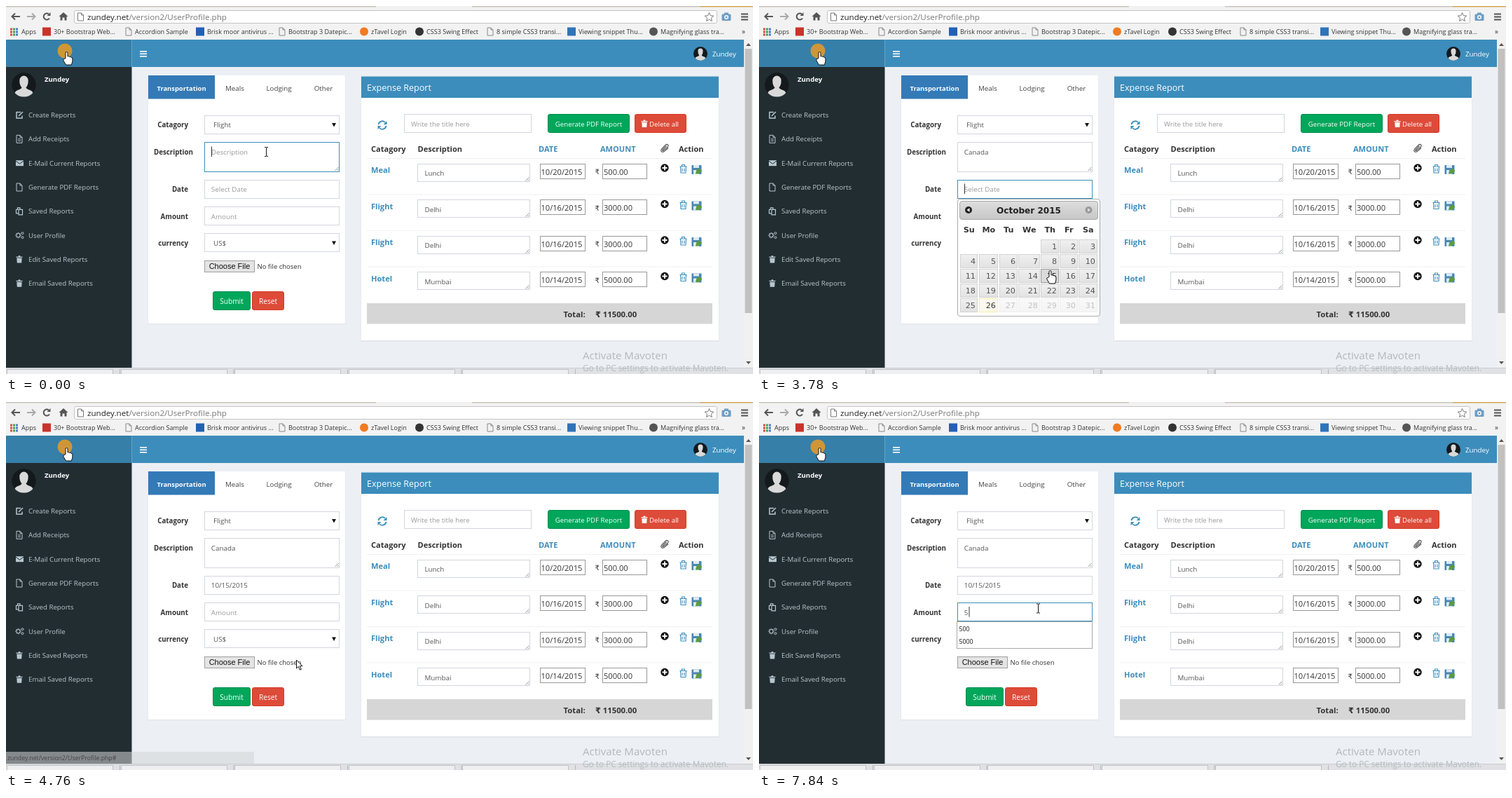
Animation of 1066x525 px, one loop 8000 ms. Source, as an HTML page:

```html
<!DOCTYPE html>
<html lang="en">
<head>
<meta charset="utf-8">
<title>Expense form</title>
<style>
html, body { margin: 0; width: 100%; height: 100%; overflow: hidden; background: #ecf0f5; }
svg { display: block; width: 100%; height: 100%; font-family: "Open Sans", "DejaVu Sans", sans-serif; }
.b { font-weight: 700; }
.m { text-anchor: middle; }
.e { text-anchor: end; }
.day { font-family: "DejaVu Sans", sans-serif; }
.sys { font-family: "Liberation Sans", Arial, sans-serif; }
</style>
</head>
<body>
<svg viewBox="0 0 1066 525">
  <defs>
    <linearGradient id="head" x2="0" y2="1"><stop stop-color="#dedede"/><stop offset="1" stop-color="#c6c6c6"/></linearGradient>
    <linearGradient id="cell" x2="0" y2="1"><stop stop-color="#f0f0f0"/><stop offset="1" stop-color="#e2e2e2"/></linearGradient>
    <clipPath id="face"><circle r="10"/></clipPath>
  </defs>
  <g id="page"></g>
  <g id="live"></g>
</svg>
<script>
const LOOP = 8000, STEP = 140;
const BLUE = '#3c8dbc', GREEN = '#00a65a', RED = '#dd4b39', LINE = '#d2d6de', INK = '#333', HINT = '#999', SIDE = '#b8c7ce';
const BRAND = 'Zundey', HOST = 'zundey.net', PATH = '/version2/UserProfile.php';

const text = (x, y, s, size = 9.8, fill = '#555', cls = '') =>
  `<text x="${x}" y="${y}" font-size="${size}" fill="${fill}" class="${cls}">${s}</text>`;
const rect = (x, y, w, h, fill, stroke = 'none', r = 0) =>
  `<rect x="${x}" y="${y}" width="${w}" height="${h}" rx="${r}" fill="${fill}" stroke="${stroke}"/>`;
const box = (x, y, w, h, stroke = LINE, fill = '#fff', r = 0) => rect(x + .5, y + .5, w - 1, h - 1, fill, stroke, r);
const circle = (x, y, r, fill, stroke = 'none') => `<circle cx="${x}" cy="${y}" r="${r}" fill="${fill}" stroke="${stroke}"/>`;
const path = (x, y, d, stroke, width = 1, fill = 'none') =>
  `<path transform="translate(${x} ${y})" d="${d}" stroke="${stroke}" stroke-width="${width}" fill="${fill}"/>`;
const solid = (x, y, d, fill) => path(x, y, d, 'none', 0, fill);
const grip = (x, y) => path(x, y, 'M-6-1l5-5M-3-1l2-2', '#888', .9);
const dropArrow = (x, y) => solid(x, y, 'M-3-2.5h6l-3 5.5z', '#111');

const FILE = 'M-4-5.5h5l3 3v8h-8zM1-5.5v3h3';
const TRASH = 'M-5-3.5h10M-2-4v-2h4v2M-4-3.5l.5 9h7l.5-9M-1.5-1v4.5M1.5-1v4.5';
const trashSolid = (x, y, fill) =>
  solid(x, y, 'M-4.5-4h3l.5-1.5h2l.5 1.5h3v1.3h-9zM-3.7-2h7.4l-.5 7h-6.4z', fill);

const POINTERS = {
  arrow: ['M0 0V12l2.8-2.6 2 4.8 2-.9-2-4.6h3.7z', '#fff'],
  hand: ['M-1.5 8.5V1q0-1.5 1.5-1.5T1.5 1V6q1.800-1 2.500.5 1.900-.8 2.400.8 2-.3 2 1.700v4l-1.500 5H-1l-3.500-6q-1-2.500 1-2.500z', '#fff'],
  beam: ['M-2.500-6.500H-.7L0-6 .7-6.500H2.500M0-6V6M-2.500 6.500H-.7L0 6l.7.5H2.500', 'none']
};
const pointer = (kind, x, y) => path(x, y, POINTERS[kind][0], '#111', 1, POINTERS[kind][1]);

const avatar = (x, y, k) => `<g transform="translate(${x} ${y}) scale(${k})">${circle(0, 0, 10, '#14191c')}
  <g clip-path="url(#face)">${solid(0, 0, 'M-3.600-3.500a3.600 4 0 0 1 7.200 0Q3.600.5 1.700 2.200q.3 1.300 4.300 2.600 2 1 2 5.200H-8q0-4.200 2-5.200 4-1.300 4.300-2.600-1.900-1.700-1.900-5.700z', '#d9d9d9')}</g></g>`;

function browser() {
  let s = rect(0, 0, 1066, 48, '#f2f2f2') + rect(0, 0, 528, 1.5, '#c9c6bd') + rect(665, 0, 325, 1.5, '#c9c6bd') + rect(990, 0, 76, 1.5, '#d6a95c');
  s += path(14, 15, 'M6 0H-5M-1-4.500L-5.500 0l4.500 4.500', '#555', 2) + path(36, 15, 'M-6 0H5M1-4.500L5.500 0 1 4.500', '#aaa', 2);
  s += path(58, 15, 'M4 2.500A4.500 4.500 0 1 1 3-3.500', '#555', 2) + solid(58, 15, 'M5.500-6v5h-5z', '#555');
  s += solid(82, 15, 'M0-6l6.500 6H4.500v5.500h-3V1.500h-3v4h-3V0h-2z', '#555');
  s += box(97, 6, 918, 19, '#c4c4c4', '#fff', 2) + path(106.500, 15.500, FILE, '#777');
  s += text(116, 19.500, `${HOST}<tspan fill="#777">${PATH}</tspan>`, 11.630, '#222');
  s += path(1003.500, 15.500, 'M0-6l1.800 4.200 4.500.4-3.400 3 1 4.400L0 3.700-3.900 6l1-4.400-3.400-3 4.500-.4z', '#777');
  s += rect(1021.500, 11.500, 13, 9.500, '#6d9dc5', 'none', 1.500) + rect(1025, 9.500, 6, 3, '#6d9dc5') + circle(1028, 16, 3, '#fff') + circle(1028, 16, 1.600, '#6d9dc5');
  s += [10.500, 14.500, 18.500].map(y => rect(1049, y, 10, 2, '#555')).join('');
  for (let i = 0; i < 9; i++) s += rect(6 + i % 3 * 4, 31.500 + (i / 3 | 0) * 4, 3, 3, ['#d9503f', '#45a05a', '#4a7fc8'][i % 3]);
  const marks = [
    [68, '30+ Bootstrap Web...', '#c8342b'], [184, 'Accordion Sample'], [287, 'Brisk moor antivirus ...', '#2360b5'],
    [403, 'Bootstrap 3 Datepic...'], [521, 'zTavel Login', '#ef7b22', 1], [600, 'CSS3 Swing Effect', '#333', 1],
    [700, '8 simple CSS3 transi...'], [817, 'Viewing snippet Thu...', '#2f74b8'], [934, 'Magnifying glass tra...', '#555', 1]
  ];
  s += text(22, 40, 'Apps', 9, INK);
  for (const [x, label, color, round] of marks) {
    s += text(x, 40, label, 9.050, INK);
    s += !color ? path(x - 9, 36.500, FILE, '#888') : round ? circle(x - 10, 36.500, 6, color) : rect(x - 16, 30.500, 12, 12, color);
  }
  return s + text(1050, 40, '»', 10, INK);
}

function sidebar() {
  let s = rect(0, 48, 179.500, 39, '#367fa9') + rect(179.500, 48, 874, 39, BLUE) + rect(0, 87, 179.500, 429, '#222d32');
  s += circle(84, 64, 10.500, '#cf9638') + pointer('hand', 86.500, 66);
  s += [64, 67.500, 71].map(y => rect(191, y, 10, 1.600, '#fff')).join('');
  s += avatar(991, 68, 1) + text(1008, 72, BRAND, 9.8, '#fff') + avatar(25.500, 112.500, 1.720) + text(55, 108, BRAND, 9.6, '#fff', 'b');
  const items = ['Create Reports', 'Add Receipts', 'E-Mail Current Reports', 'Generate PDF Reports', 'Saved Reports', 'User Profile', 'Edit Saved Reports', 'Email Saved Reports'];
  const icons = [
    y => path(19, y, 'M2-4h-6v8.500h8V1M-1 1.500L5-4.500', SIDE, 1.500),
    y => path(19, y, FILE + 'M-2 0h4M-2 2.500h4', SIDE),
    y => rect(14, y - 4, 11, 8, SIDE) + path(19.500, y, 'M-5.500-3L0 1l5.500-4', '#222d32'),
    y => path(19, y, FILE, SIDE),
    y => path(19, y, 'M-4.500-2.500h2v-2.500h3.500v2M-4.500-2.500V3H-1M-1-2.500H4.500V5H-1z', SIDE, 1.200),
    y => circle(17.500, y, 2.600, 'none', SIDE) + path(17.500, y, 'M-4 0h1M3 0h1M0-4v1M0 3v1M-2.800-2.800l.7.7M2.100 2.100l.7.7M-2.800 2.800l.7-.7M2.100-2.100l.7-.7', SIDE, 1.700) +
         circle(23.500, y - 3, 1.500, 'none', SIDE) + circle(23.500, y + 3, 1.500, 'none', SIDE),
    y => trashSolid(19, y, SIDE), y => trashSolid(19, y, SIDE)
  ];
  items.forEach((label, i) => {
    const y = 155.500 + i * 34.330;
    s += icons[i](y) + text(32, y + 3.500, label, 9.7, SIDE);
  });
  return s;
}

function form() {
  let s = rect(202.500, 99, 282, 355, '#dfe3e8') + rect(203, 99, 281, 354, '#fff') + rect(203, 99, 95, 33.500, '#337ab7');
  s += text(250.500, 120.500, 'Transportation', 9.4, '#fff', 'b m');
  [['Meals', 326.500], ['Lodging', 389.500], ['Other', 453]].forEach(([label, x]) => s += text(x, 121, label, 9.8, '#444', 'm'));
  [['Catagory', 173], ['Description', 212, 267], ['Date', 265], ['Amount', 303.500], ['currency', 342]]
    .forEach(([label, y, x = 260]) => s += text(x, y, label, 9.750, INK, 'b e'));
  s += box(283, 156, 193, 27) + text(296, 173, 'Flight') + dropArrow(468, 169.500);
  s += box(283, 324, 193, 27) + text(296, 342, 'US$') + dropArrow(468, 338);
  s += box(283, 363, 72, 17, '#a0a0a0', '#e4e4e4') + text(319, 375.300, 'Choose File', 11, '#111', 'sys m') + text(358.500, 375, 'No file chosen', 9.5, INK);
  s += box(295, 407, 54, 27, '#008d4c', GREEN, 2.500) + text(322, 424.500, 'Submit', 10.100, '#fff', 'm');
  return s + box(351, 407, 46, 27, '#d73925', RED, 2.500) + text(374, 424.500, 'Reset', 10.100, '#fff', 'm');
}

function report() {
  let s = rect(506.500, 99.500, 511, 379, '#dfe3e8') + rect(507, 100, 510, 377, '#fff') + rect(507, 100.500, 510, 30.500, BLUE);
  s += text(515, 121, 'Expense Report', 12.550, '#fff');
  s += path(537, 170, 'M-5.500-.8A5.500 5.500 0 0 1 4-4M5.500.8A5.500 5.500 0 0 1-4 4', BLUE, 1.800) + solid(537, 170, 'M6.500-6v5h-5zM-6.500 6V1h5z', BLUE);
  s += box(568, 154, 182, 27) + text(578, 171.500, 'Write the title here', 9.650, HINT);
  s += box(773, 154, 117, 27, '#008d4c', GREEN, 2.500) + text(831.500, 171.500, 'Generate PDF Report', 9.7, '#fff', 'm');
  s += box(897, 154, 74, 27, '#d73925', RED, 2.500) + trashSolid(911, 168, '#fff') + text(918, 171.500, 'Delete all', 9.7, '#fff');
  [['Catagory', 521, INK], ['Description', 587.500, INK], ['DATE', 760, BLUE], ['AMOUNT', 848, BLUE], ['Action', 960, INK]]
    .forEach(([label, x, color]) => s += text(x, 207.500, label, 11.050, color, 'b'));
  s += path(940, 202.500, 'M2.500-3L-3 2.500q-.8 1.500.8 1.500L4.500-1.500q1.500-2.500-.7-3.500-1.500-.5-2.500.7L-4 1q-2.500 3 0 4.500 2 .8 4-1.200L5 0', '#444', 1.100);
  const rows = [['Meal', 'Lunch', '10/20/2015', '500.00'], ['Flight', 'Delhi', '10/16/2015', '3000.00'],
    ['Flight', 'Delhi', '10/16/2015', '3000.00'], ['Hotel', 'Mumbai', '10/14/2015', '5000.00']];
  rows.forEach(([kind, note, date, sum], i) => {
    const y = i * 51.500;
    s += rect(515, 217 + y, 493, 1, '#f1f1f1') + text(521, 238 + y, kind, 11.100, BLUE, 'b');
    s += box(587, 225 + y | 0, 161, 26) + text(597.500, 242 + y, note) + grip(747.500, (251 + y | 0) - .5);
    s += box(762, 225 + y | 0, 65, 22, '#999') + text(763.500, 240.500 + y, date, 11.100, INK);
    s += text(840.500, 240 + y, '₹', 10, INK) + box(851, 225 + y | 0, 64, 22, '#999') + text(853, 240.500 + y, sum, 11.100, INK);
    s += circle(940, 231 + y, 5.700, '#111') + path(940, 231 + y, 'M-3.500 0h7M0-3.500v7', '#fff', 1.800) + path(966.500, 232.500 + y, TRASH, BLUE, 1.100);
    s += rect(978.500, 227 + y, 14, 13, '#4a86b4', 'none', 1) + rect(981, 227 + y, 8, 4, '#dcebf5') + rect(981, 234 + y, 8, 6, '#dcebf5');
    s += solid(989, 235 + y, 'M-3.500-1.500h2.500V-4L4.500 0-1 4.500h-4z', '#5c9b3c');
  });
  return s + rect(515, 424, 493, 29.500, '#d6d6d6') + text(795.500, 443.500, 'Total:', 11.300, INK, 'b') + text(841, 443.500, '₹ 11500.00', 11.300, INK, 'b');
}

function edges() {
  let s = rect(1053, 48, 13, 468, '#f1f1f1') + rect(1054.500, 61, 10, 377, '#c1c1c1');
  s += solid(1059.500, 55, 'M-3.500 2L0-2l3.500 4z', '#555') + solid(1059.500, 509, 'M-3.500-2L0 2l3.500-4z', '#555');
  s += rect(0, 516, 1066, 9, '#dfe1e4') + rect(0, 516, 1066, 1, '#c9ccd0');
  for (let i = 0; i < 5; i++) s += box(1 + Math.round(162.500 * i), 518, 152, 12, '#bfc2c6', '#eeeff1') + rect(162 + 162.500 * i, 518, 1, 7, '#b5b8bc');
  return s + text(823, 504, 'Activate Mavoten', 15.050, '#b3b8be') + text(823, 520.500, 'Go to PC settings to activate Mavoten.', 11.800, '#b6babf');
}

const COLS = [[287, 25], [314, 27], [343, 26], [370, 31], [402, 26], [429, 26], [456, 27]];

function calendar(mx, my, opacity) {
  let s = rect(283.500, 275.500, 203, 167, '#fff', '#aaa', 3.500) + rect(286.500, 278.500, 197, 26, 'url(#head)', '#aaa', 3.500);
  s += circle(299, 291, 5, '#222') + solid(299, 291, 'M1.500-2.800v5.600L-2.500 0z', '#fff');
  s += circle(470.500, 291, 5, '#999') + solid(470.500, 291, 'M-1.500-2.800v5.600L2.500 0z', '#ddd');
  s += text(385, 296, 'October 2015', 12.050, '#222', 'day b m');
  COLS.forEach(([x, w], c) => s += text(x + w / 2 + .3, 323, ['Su', 'Mo', 'Tu', 'We', 'Th', 'Fr', 'Sa'][c], 11.200, INK, 'day b m'));
  for (let d = 1; d <= 31; d++) {
    const [x, w] = COLS[(d + 3) % 7], y = Math.round(333 + 21.100 * ((d + 3) / 7 | 0));
    const hover = d < 27 && mx >= x && mx < x + w && my >= y && my < y + 20;
    const [fill, line, ink] = hover ? ['#dadada', '#999', '#212121'] : d === 26 ? ['#fbf9ee', '#fcefa1', '#363636'] : ['url(#cell)', '#d3d3d3', '#555'];
    s += `<g opacity="${d > 26 ? .35 : 1}">${box(x, y, w, 20, line, fill)}${text(x + w - 3, y + 14, d, 11.200, ink, 'day e')}</g>`;
  }
  return `<g opacity="${opacity}">${s}</g>`;
}

// Pointer stops: time, x, y
const TRACK = [[2520, 371.500, 208], [2940, 371, 258], [3220, 372, 263], [3640, 413, 374], [3780, 415.500, 378], [4060, 416, 380],
  [4340, 417.500, 385.500], [4480, 415.500, 385], [4620, 415.500, 385], [4760, 414.500, 368], [5040, 412, 350], [5600, 398.500, 294.500]];

function mouseAt(t) {
  const i = TRACK.findIndex(k => k[0] > t);
  if (i < 1) return (i ? TRACK[TRACK.length - 1] : TRACK[0]).slice(1);
  const [a, b] = [TRACK[i - 1], TRACK[i]], k = (t - a[0]) / (b[0] - a[0]);
  return [1, 2].map(j => a[j] + (b[j] - a[j]) * k);
}

// Latest value of [start, value] pairs
const at = (t, ...pairs) => pairs.reduce((v, [start, next]) => t >= start ? next : v, undefined);

const pen = document.createElement('canvas').getContext('2d');
function input(y, h, base, value, hint, focused, caret) {
  pen.font = '9.8px "Open Sans", "DejaVu Sans", sans-serif';
  const x = 293 + (value ? Math.round(pen.measureText(value).width) + .5 : 0);
  return box(283, y, 193, h, focused ? BLUE : LINE) + text(292.800, base, value || hint, 9.8, value ? '#555' : HINT) +
    (focused && caret ? rect(x, base - 11.500, 1, 14.500, INK) : '');
}

function scene(t) {
  const [mx, my] = mouseAt(t);
  const fade = at(t, [0, 0], [3220, .5], [3360, 1], [4200, .8], [4340, .1], [4480, 0]);
  const status = at(t, [0, 0], [3920, 1], [4760, .55], [4900, 0]);
  const note = at(t, [0, ''], [840, 'C'], [1120, 'Ca'], [1540, 'Cana'], [2100, 'Canada']);
  const sum = at(t, [0, ''], [7700, '5']);
  const blink = at(t, [0, 1], [280, 0], [840, 1], [6300, 0], [6720, 1], [7140, 0], [7700, 1]);

  let s = input(194, 43, 212, note, 'Description', t < 3080, blink) + grip(475.500, 236);
  s += input(248, 27, 265, t < 4200 ? '' : '10/15/2015', 'Select Date', t >= 3080 && t < 4200, 1);
  s += input(286, 27, 303.500, sum, 'Amount', t >= 5600, blink);
  if (t >= 7840) s += box(282, 313, 194, 39, '#a9a9a9') + text(285.500, 326.500, '500', 8.8, '#111') + text(285.500, 345, '5000', 8.8, '#111');
  if (fade) s += calendar(mx, my, fade);
  if (status) s += `<g opacity="${status}">${solid(0, 499, 'M0 0H352q2 0 2 2V17H0z', '#d4d5d7')}</g>` + text(2, 511, HOST + PATH + '#', 8.750, '#444');

  const inField = [[194, 237], [248, 275], [286, 313]].some(([a, b]) => my > a && my < b);
  const kind = fade && my > 275 ? (my > 332 ? 'hand' : 'arrow') : inField ? 'beam' : 'arrow';
  return s + pointer(kind, mx, my);
}

const live = document.getElementById('live');
document.getElementById('page').innerHTML = rect(0, 0, 1066, 525, '#ecf0f5') + browser() + sidebar() + form() + report() + edges();

let shown = -1;
const start = performance.now();
function tick() {
  const t = Math.floor((performance.now() - start) % LOOP / STEP) * STEP;
  if (t !== shown) live.innerHTML = scene(shown = t);
  requestAnimationFrame(tick);
}
tick();
</script>
</body>
</html>
```
